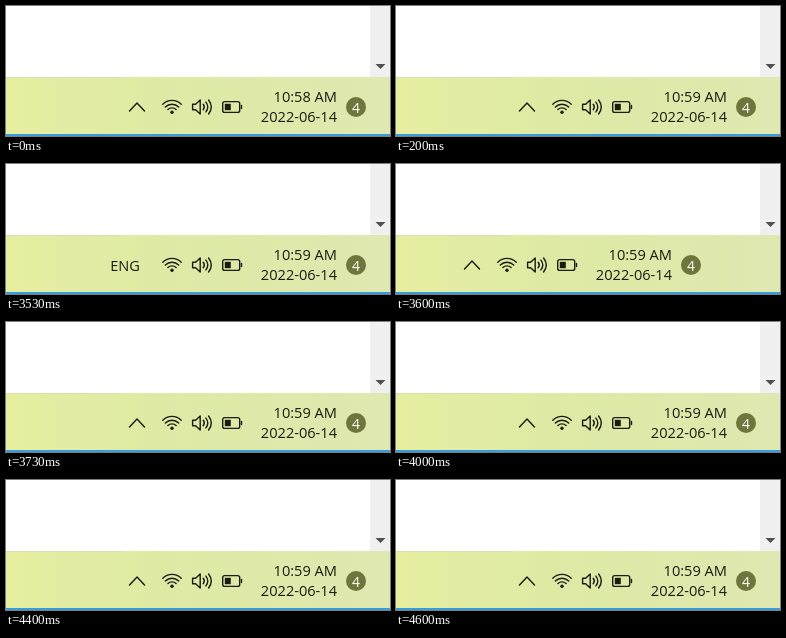
Write an HTML page that moves like this. It is 384x130 px and loops after 6.79 s.

```html
<!DOCTYPE html>
<html lang="en">
<head>
<meta charset="utf-8">
<title>Taskbar tray flicker</title>
<style>
  html, body { margin: 0; width: 100%; height: 100%; overflow: hidden; background: #fff; }
  svg { display: block; width: 384px; height: 130px; font-family: "Open Sans", "Noto Sans", sans-serif; }
  text { fill: #1a1c12; font-size: 14.6px; }
  .line { fill: none; stroke: #1a1c12; stroke-width: 1.4; stroke-linecap: round; stroke-linejoin: round; }
</style>
</head>
<body>
<svg viewBox="0 0 384 130">
  <defs>
    <linearGradient id="bar">
      <stop offset="0" stop-color="#e7ee9f"/>
      <stop offset=".15" stop-color="#e3eca3"/>
      <stop offset=".4" stop-color="#deeaa4"/>
      <stop offset=".7" stop-color="#dee9aa"/>
      <stop offset="1" stop-color="#dfe8b1"/>
    </linearGradient>
  </defs>
  <rect x="364" width="20" height="71" fill="#f0f0f0"/>
  <path d="M369.5 58h10l-5 5z" fill="#505050"/>
  <rect y="71" width="384" height="57" fill="url(#bar)"/>
  <rect y="71" width="116" height="1" fill="#d9dfb2"/>
  <rect y="128" width="384" height="2" fill="#369cde"/>

  <g id="tray">
    <g class="line">
      <path d="M156.8 98.2a13 13 0 0 1 18.4 0M159.3 101a9.5 9.5 0 0 1 13.4 0M161.9 103.6a5.8 5.8 0 0 1 8.2 0"/>
      <path d="M186.6 98.2h3l4.6-4.2v14l-4.6-4.2h-3z"/>
      <path d="M197.2 98.2q2.2 2.8 0 5.6M199.9 96.1q3.8 4.9 0 9.8M202.6 94q5.4 7 0 14"/>
      <rect x="216.7" y="95.6" width="17" height="10.8" rx="2"/>
      <path d="M235.5 99.5v3"/>
    </g>
    <circle cx="166" cy="106.3" r="1.7" fill="#1a1c12"/>
    <rect x="218.8" y="97.8" width="6" height="6.4" fill="#1a1c12"/>
    <text id="time" x="331" y="96" text-anchor="end"></text>
    <text x="331" y="116" text-anchor="end">2022-06-14</text>
    <circle cx="350" cy="101" r="10" fill="#6f763c"/>
    <text x="350" y="107" text-anchor="middle" style="fill:#fff;font-size:14px">4</text>
  </g>
  <text id="lang" x="104.2" y="107">ENG</text>
  <path id="caret" class="line" d="M-7.5 4L0-4L7.5 4"/>
</svg>
<script>
  const LOOP = 6790, START = 3395, STEP = 200 / 3;
  const HOME = 131, SHIFT = -55;
  // E: label replaces the caret, C: everything jumps left,
  // S: only the caret is back, N: at rest
  const STEPS = "EN" + "ECSN".repeat(3) + "ENESN";
  const POSES = {
    N: { tray: 0, caret: HOME },
    E: { tray: 0, caret: null },
    C: { tray: SHIFT, caret: HOME + SHIFT },
    S: { tray: SHIFT, caret: HOME }
  };
  const el = id => document.getElementById(id);
  const tray = el("tray"), lang = el("lang"), caret = el("caret"), time = el("time");
  const show = (node, on) => node.setAttribute("visibility", on ? "visible" : "hidden");

  function draw(t) {
    const pose = POSES[STEPS[Math.floor((t - START) / STEP)] || "N"];
    time.textContent = t < 200 ? "10:58 AM" : "10:59 AM";
    tray.setAttribute("transform", `translate(${pose.tray} 0)`);
    show(lang, pose.caret === null);
    show(caret, pose.caret !== null);
    caret.setAttribute("transform", `translate(${pose.caret ?? HOME} 101)`);
  }

  const begin = performance.now();
  function frame() {
    draw((performance.now() - begin) % LOOP);
    requestAnimationFrame(frame);
  }
  frame();
</script>
</body>
</html>
```
